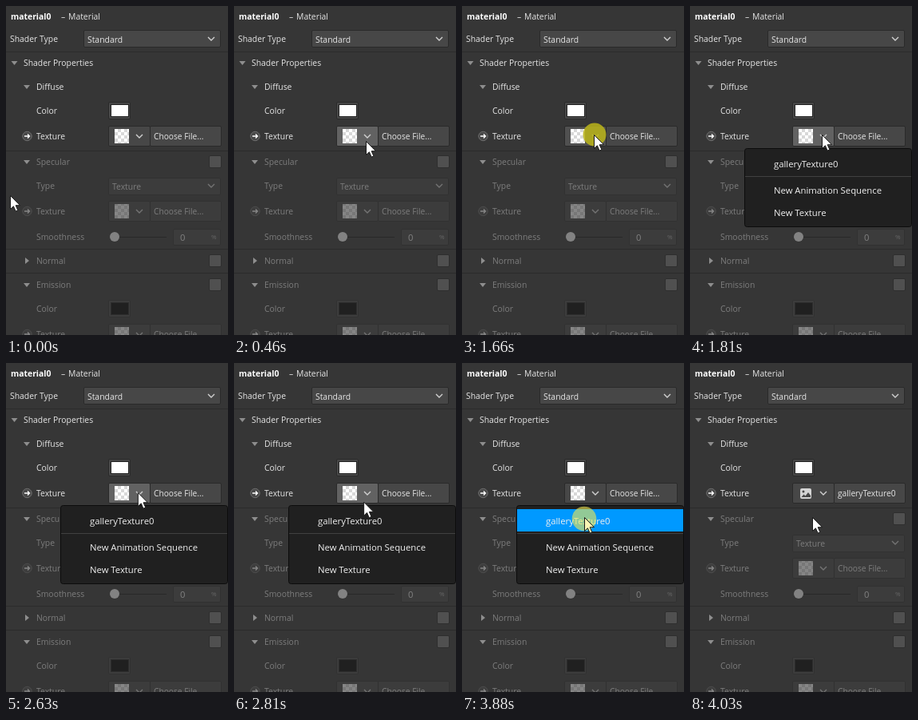
Recreate the animation shown at these times as an HTML page. Size 278 by 412 pixels, loop 5.59 s.

```html
<!DOCTYPE html>
<html>
<head>
<meta charset="utf-8">
<title>Material panel</title>
<style>
html, body { margin: 0; width: 100%; height: 100%; overflow: hidden; background: #363636; }
svg { display: block; width: 278px; height: 412px; }
text { font: 10.4px "Open Sans", "Noto Sans", sans-serif; fill: #e6e6e6; white-space: pre; }
.bold { font-weight: 700; fill: #fff; }
.menu { font-size: 11.3px; fill: #f0f0f0; }
.field { font-size: 10.2px; }
.dim { opacity: .4; }
.box { fill: #474747; stroke: #2a2a2a; }
.tick { fill: #505050; stroke: #2e2e2e; }
.line { stroke: #2b2b2b; }
.mark { fill: none; stroke: #d0d0d0; stroke-width: 1.4; }
.fold { fill: #8e8e8e; }
</style>
</head>
<body>
<svg id="stage" viewBox="0 0 278 412"></svg>
<script>
const LOOP = 5590;
const stage = document.getElementById('stage');

// Static parts
const label = (x, y, s, cls = '') => `<text x="${x}" y="${y}" class="${cls}">${s}</text>`;
const box = (x, y, w, h, extra = '', cls = 'box') =>
  `<rect class="${cls}" x="${x + .5}" y="${y + .5}" width="${w - 1}" height="${h - 1}" rx="1.5" ${extra}/>`;
const rule = (x, y) => `<path class="line" d="M${x} ${y + .5}H278"/>`;
const chevron = (x, y) => `<path class="mark" d="M${x - 4} ${y - 2}l4 4 4-4"/>`;
const down = (x, y) => `<path class="fold" d="M${x - 4} ${y - 2}h8l-4 5z"/>`;
const right = (x, y) => `<path class="fold" d="M${x - 2} ${y - 4}v8l5-4z"/>`;
const patch = y =>
  `<circle cx="26.5" cy="${y}" r="5.700" fill="#484848" stroke="#707070"/>
   <path d="M23 ${y}h6.500M27 ${y - 2.5}l2.500 2.500-2.500 2.500" fill="none" stroke="#fff" stroke-width="1.3"/>`;
const dim = s => `<g class="dim">${s}</g>`;
const checker = (y, id = '') => `<rect ${id} x="136" y="${y - 9}" width="18" height="18" fill="url(#check)"/>`;
const swatch = (y, color) =>
  box(128, y - 11, 28, 22) +
  `<rect x="131.500" y="${y - 7.5}" width="22" height="15" fill="${color}" stroke="#222"/>`;
const picker = y =>
  patch(y) + label(38, y + 4, 'Texture') + box(128, y - 13, 53, 26) +
  box(180, y - 13, 90, 26) + checker(y) + chevron(167, y) + label(185, y + 4, 'Choose File...', 'field');

const panel =
  label(6, 17, 'material0', 'bold') + label(69, 17, '–') + label(78, 17, 'Material') +
  label(5, 45, 'Shader Type') + box(97, 30, 172, 22) + label(102, 46, 'Standard') + chevron(257, 41) +
  rule(0, 57) + down(10.5, 71) + label(22, 75, 'Shader Properties') +
  down(26, 101) + label(38, 105, 'Diffuse') +
  label(38, 135, 'Color') + swatch(131, '#fff') +
  patch(163) + label(38, 167, 'Texture') +
  box(128, 150, 53, 26, 'id="thumb"') + box(180, 150, 90, 26) +
  checker(163, 'id="empty"') +
  `<g id="image">
     <rect x="138" y="157" width="14" height="13" rx="2" fill="#d4d4d4"/>
     <circle cx="142" cy="161" r="1.5" fill="#474747"/>
     <path d="M139.500 168l3-3.500 2 2 3.500-4.500 3 4v2z" fill="#474747"/>
   </g>` +
  chevron(167, 163) + `<text id="file" class="field" x="185" y="167"></text>` +
  rule(0, 181) + rule(0, 304) + rule(0, 334) +
  [187, 311, 341].map(y => box(254, y, 16, 16, '', 'tick')).join('') +
  down(26, 195) + right(26, 319) + down(26, 349) +
  dim(
    label(38, 199, 'Specular') +
    label(38, 229, 'Type') + box(128, 215, 141, 22) + label(133, 230, 'Texture') + chevron(257, 225) +
    picker(257) +
    label(38, 293, 'Smoothness') +
    '<path d="M136 289.500H201" stroke="#161616"/><circle cx="136" cy="289" r="6" fill="#f4f4f4"/>' +
    box(209, 279, 60, 21) + label(218, 294, '0', 'menu') +
    '<text x="257" y="292" style="font-size:8px;opacity:.6">%</text>' +
    label(38, 323, 'Normal') +
    label(38, 353, 'Emission') +
    label(38, 383, 'Color') + swatch(379, '#000') +
    picker(411)
  );

const menu =
  `<g id="menu">
     <rect x="68.500" y="178.500" width="209" height="98" rx="3" fill="#202020" stroke="#0c0c0c"/>
     <path d="M69 213.500H277" stroke="#414141"/>
     <rect id="pick" x="69" y="183" width="208" height="28" fill="#0099ff"/>` +
  label(105, 202, 'galleryTexture0', 'menu') +
  label(105, 235, 'New Animation Sequence', 'menu') +
  label(105, 263, 'New Texture', 'menu') + '</g>';

stage.innerHTML =
  `<defs><pattern id="check" x="136" y="154" width="8" height="8" patternUnits="userSpaceOnUse">
     <path d="M0 0h8v8h-8z" fill="#fff"/><path d="M4 0h4v4h-4zM0 4h4v4h-4z" fill="#d8d8d8"/>
   </pattern></defs>
   <rect width="278" height="412" fill="#363636"/>` + panel + menu +
  `<circle id="click"/>
   <path id="arrow" d="M.5.5v17l3.900-3.700 2.700 6.300 2.800-1.200-2.700-6.200h5.300z" fill="#fff" stroke="#1a1a1a"/>`;

const el = id => document.getElementById(id);
const [thumb, empty, image, file, menuBox, pick, click, arrow] =
  ['thumb', 'empty', 'image', 'file', 'menu', 'pick', 'click', 'arrow'].map(el);
const show = (node, on) => node.setAttribute('display', on ? 'inline' : 'none');

// Pointer moves: start, end, steps, from, bend, to
const moves = [
  [50, 460, 9, [5, 237], [95, 222], [165, 169]],
  [510, 560, 1, [165, 169], [165, 167], [165, 163]],
  [690, 770, 2, [165, 163], [165, 162], [165, 161]],
  [2630, 3060, 9, [165, 161], [162, 180], [153, 193]]
];
const ease = p => p * p * (3 - 2 * p);

function pointer(t) {
  let pos = moves[0][3];
  for (const [a, b, n, from, bend, to] of moves) {
    if (t < a) break;
    const step = Math.floor((t - a) / (b - a) * n) + 1;
    const p = t >= b ? 1 : ease(step / (n + 1));
    const q = 1 - p;
    pos = from.map((v, i) => q * q * v + 2 * q * p * bend[i] + p * p * to[i]);
  }
  return pos;
}

function draw(t) {
  const [x, y] = pointer(t);
  const open = t >= 1810 && t < 4030;
  const done = t >= 4030;
  const first = t >= 1660 && t < 1810;
  const second = t >= 3880 && t < 4030;
  const over = x > 129 && x < 179 && y > 150 && y < 176;

  arrow.setAttribute('transform', `translate(${x.toFixed(2)} ${y.toFixed(2)})`);
  arrow.setAttribute('fill', second ? '#f8f4b4' : '#fff');
  thumb.style.fill = first ? '#505050' : over ? '#626262' : '#474747';
  show(empty, !done);
  show(image, done);
  file.textContent = done ? 'galleryTexture0' : 'Choose File...';
  show(menuBox, open);
  show(pick, y > 183);

  show(click, first || second);
  const late = t >= (first ? 1760 : 3980);
  click.setAttribute('cx', first ? 166 : 153);
  click.setAttribute('cy', first ? 161 : 195);
  click.setAttribute('r', first ? 14.5 : 15.3);
  click.setAttribute('fill', first ? '#bab41a' : '#f4ea50');
  click.setAttribute('fill-opacity', (first ? .86 : .6) * (late ? .5 : 1));
}

const start = performance.now();
function tick() {
  draw((performance.now() - start) % LOOP);
  requestAnimationFrame(tick);
}
draw(0);
requestAnimationFrame(tick);
</script>
</body>
</html>
```
